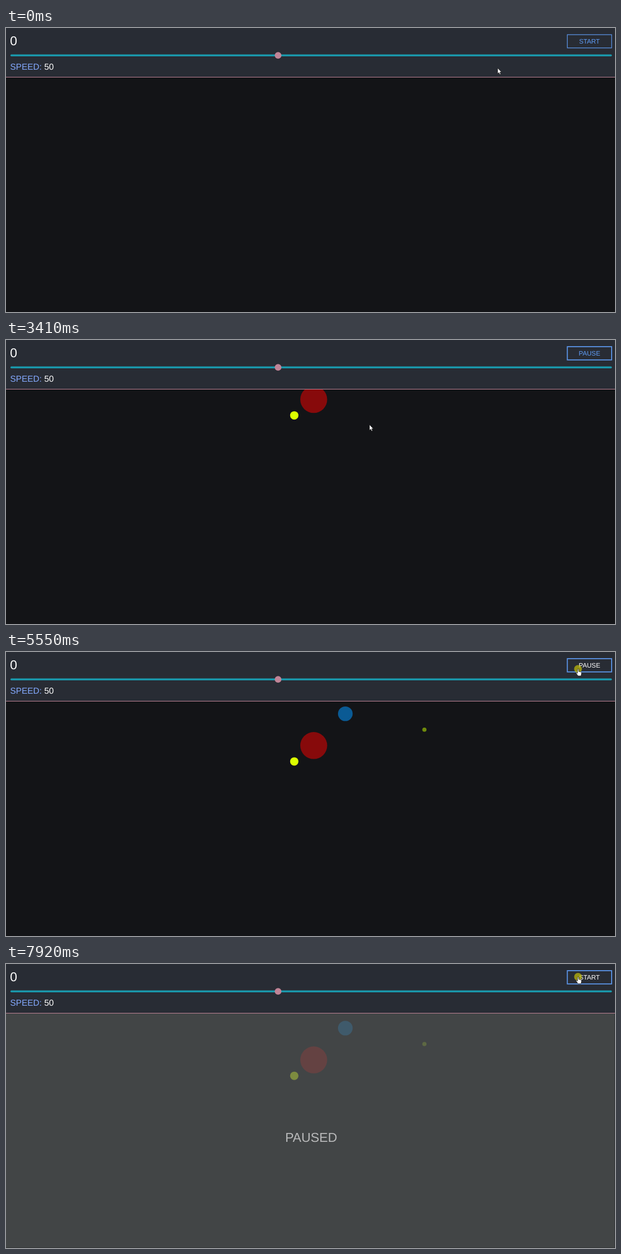
Recreate the animation shown at these times as an HTML page. Size 1095 by 511 pixels, loop 7990 ms.

```html
<!DOCTYPE html>
<html lang="en">
<head>
<meta charset="utf-8">
<title>Falling dots</title>
<style>
  html, body { margin: 0; width: 100%; height: 100%; overflow: hidden; background: #131417; }
  svg { display: block; font-family: "Liberation Sans", Arial, sans-serif; text-rendering: geometricPrecision; }
</style>
</head>
<body>
<svg width="1095" height="511" viewBox="0 0 1095 511">
  <rect width="1095" height="511" fill="#131417"/>
  <g id="dots"></g>
  <g id="overlay">
    <rect y="89" width="1094.6" height="421.6" fill="#565a5a"/>
    <text x="548.7" y="319.5" font-size="23.2" text-anchor="middle" fill="#fff">PAUSED</text>
  </g>

  <rect width="1095" height="88" fill="#282c34"/>
  <rect y="88" width="1095" height="1" fill="#c08497"/>
  <text x="7.3" y="31.3" font-size="23" fill="#fff">0</text>
  <rect x="8" y="47.5" width="1081.4" height="3.5" rx="1.7" fill="#1a98ab"/>
  <circle cx="489.2" cy="49.3" r="6" fill="#c08497"/>
  <text x="7.5" y="75.2" font-size="15.5" fill="#84a9ff">SPEED: <tspan fill="#fff">50</tspan></text>
  <rect id="frame" x="1009.3" y="12" width="79.6" height="23.8" fill="none" stroke="#5c96ea"/>
  <text id="label" x="1049.1" y="27.6" font-size="11.7" text-anchor="middle"></text>

  <g id="pointer">
    <circle id="press" r="7" fill="rgb(190,186,10)" fill-opacity=".72"/>
    <path id="arrow" d="M0 0V10.2L2.3 8.2L3.9 11.7L5.6 11L4.1 7.5H7Z" fill="#fff" stroke="#111" stroke-width=".7"/>
    <path id="hand" d="M-.8 .8Q.3 -.5 1.3 .8V4.6L5.6 5.6Q6.6 6 6.4 7.4L5.4 12.5H0L-3.4 7.6Q-3.2 6.2 -2 6.8L-.8 7.8Z" fill="#fff" stroke="#111" stroke-width=".7"/>
  </g>
</svg>
<script>
const LOOP = 7990, STARTED = 750, STOPPED = 5700, PAUSED = 5860;
const SPEED = 28.6, TOP = 89.6, FIRST = 1800, INTERVAL = 1000;
const $ = id => document.getElementById(id);
const show = (el, on) => el.setAttribute("visibility", on ? "visible" : "hidden");
const clamp = k => Math.max(0, Math.min(1, k));
const smooth = k => k * k * (3 - 2 * k);

const dots = [
  { cx: 518.3, r: 7.5, fill: "#dcff00" },
  { cx: 553.3, r: 24.2, fill: "#870a0b" },
  { cx: 752.3, r: 3.8, fill: "#6f8a0c" },
  { cx: 610.1, r: 13.2, fill: "#0a5a94" },
].map((look, i) => {
  const el = document.createElementNS("http://www.w3.org/2000/svg", "circle");
  for (const name in look) el.setAttribute(name, look[name]);
  $("dots").append(el);
  return { el, born: FIRST + i * INTERVAL };
});

// each move ends at x, y; a click lasts until the next move
const home = { x: 884, y: 72 };
const moves = [
  { from: 290, to: 650, x: 1028.5, y: 30.5, click: true },
  { from: 900, to: 1220, x: 653.5, y: 152.3 },
  { from: 3900, to: 4500, x: 934, y: 158 },
  { from: 4750, to: 5350, x: 1028.5, y: 30.5, click: true },
  { from: PAUSED, to: 6250, x: 737.8, y: 138.8, click: true },
  { from: 6450, to: 6820, x: 567, y: 161 },
  { from: 6850, to: 7780, x: 1028.5, y: 23, click: true },
];

function pointerAt(t) {
  let { x, y } = home, pressed = false;
  for (const m of moves.filter(m => t >= m.from)) {
    const k = smooth(clamp((t - m.from) / (m.to - m.from)));
    x += (m.x - x) * k;
    y += (m.y - y) * k;
    pressed = m.click && t >= m.to;
  }
  return { x, y, pressed };
}

function draw(t) {
  for (const { el, born } of dots) {
    show(el, t >= born);
    el.setAttribute("cy", TOP + SPEED * (Math.min(t, STOPPED) - born) / 1000);
  }
  const fade = smooth(clamp((t - STOPPED) / 1000) ** 0.55);
  $("overlay").setAttribute("opacity", t < PAUSED ? 0 : 0.7 * fade);

  const { x, y, pressed } = pointerAt(t);
  const hover = x > 1009 && x < 1089 && y > 11 && y < 36;
  const running = t >= STARTED && t < PAUSED;
  $("label").textContent = running ? "PAUSE" : "START";
  $("label").setAttribute("fill", hover ? "#fff" : "#5f9df7");
  $("frame").setAttribute("stroke-width", running || (hover && pressed) ? 1.8 : 1.25);

  $("pointer").setAttribute("transform", `translate(${x} ${y})`);
  show($("arrow"), !hover);
  show($("hand"), hover);
  show($("press"), pressed);
}

const start = performance.now();
function tick() {
  draw((performance.now() - start) % LOOP);
  requestAnimationFrame(tick);
}
tick();
</script>
</body>
</html>
```
